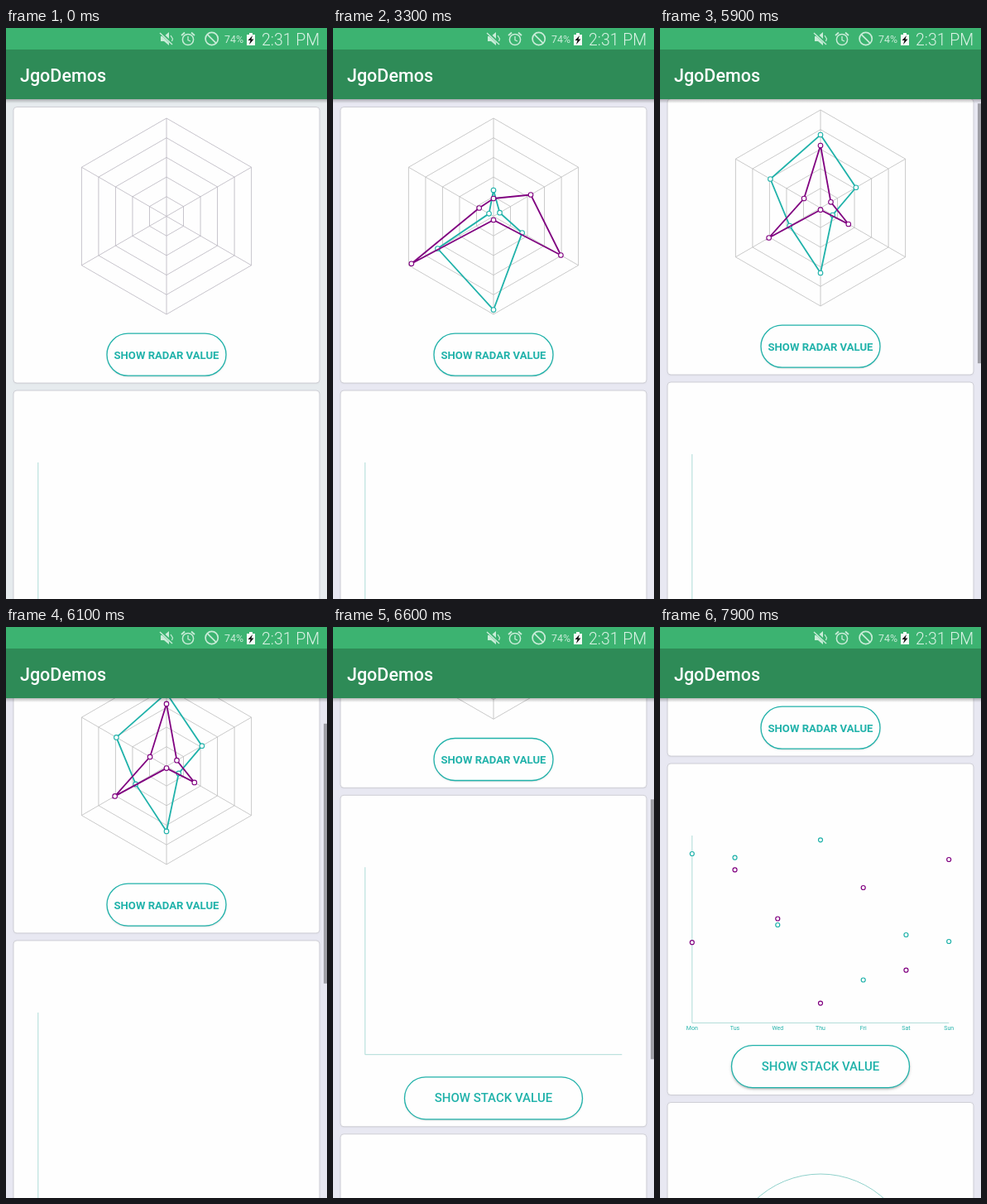
Write an HTML page with a canvas that moves like this. It is 388 px wide and 690 px high and loops after 8 s.

```html
<!DOCTYPE html>
<html lang="en">
<head>
<meta charset="utf-8">
<title>Charts</title>
<style>
  html, body { margin: 0; width: 100%; height: 100%; overflow: hidden; background: #e8e8f2; }
  canvas { display: block; width: 388px; height: 690px; }
</style>
</head>
<body>
<canvas id="stage"></canvas>
<script>
const W = 388, H = 690, LOOP = 8000, STEP = 100;
const TEAL = '#20b2aa', PURPLE = '#800080', AXIS = '#a6d9d4', ICON = '#c9ecd8';
const canvas = document.getElementById('stage');
const ctx = canvas.getContext('2d');
const dpr = window.devicePixelRatio || 1;
canvas.width = W * dpr;
canvas.height = H * dpr;

// Radar radii, clockwise from the top
const radar = [
  { color: TEAL, a: [31.5, 8.7, 40, 113, 78, 6.3], b: [88.5, 49.5, 17, 78.5, 43, 70] },
  { color: PURPLE, a: [21.5, 52, 94, 4.5, 114.5, 20], b: [75.5, 14.4, 39, 2.2, 72, 23] }
];
const days = ['Mon', 'Tus', 'Wed', 'Thu', 'Fri', 'Sat', 'Sun'];
const stack = [
  { color: TEAL, y: [547, 551.7, 633, 530.3, 699.5, 645, 653] },
  { color: PURPLE, y: [654.2, 566.4, 625.5, 727.6, 588, 687.7, 554] }
];

const clamp = x => Math.max(0, Math.min(1, x));
const span = (t, from, to) => clamp((t - from) / (to - from));
const smooth = u => 0.5 - Math.cos(Math.PI * u) / 2;

function scrollAt(t) {
  if (t < 6300) return 135 * Math.pow(span(t, 5800, 6300), 1.617);
  return 135 + 138 * (1 - Math.pow(1 - span(t, 6300, 6900), 1.85));
}

function line(points, color, width, close) {
  ctx.beginPath();
  points.forEach(([x, y]) => ctx.lineTo(x, y));
  if (close) ctx.closePath();
  ctx.strokeStyle = color;
  ctx.lineWidth = width;
  ctx.stroke();
}

function circle(x, y, r, color, width, fill) {
  ctx.beginPath();
  ctx.arc(x, y, r, 0, Math.PI * 2);
  if (fill) {
    ctx.fillStyle = fill;
    ctx.fill();
  }
  ctx.strokeStyle = color;
  ctx.lineWidth = width;
  ctx.stroke();
}

function text(str, x, y, font, color, align = 'left') {
  ctx.font = font + ' Roboto, sans-serif';
  ctx.fillStyle = color;
  ctx.textAlign = align;
  ctx.fillText(str, x, y);
}

function box(x, y, w, h, r, stroke, width, shadow, depth) {
  ctx.beginPath();
  ctx.roundRect(x, y, w, h, r);
  ctx.save();
  ctx.shadowColor = shadow;
  ctx.shadowBlur = depth * 2 * dpr;
  ctx.shadowOffsetY = depth * dpr;
  ctx.fillStyle = '#fefefe';
  ctx.fill();
  ctx.restore();
  ctx.strokeStyle = stroke;
  ctx.lineWidth = width;
  ctx.stroke();
}

function card(y, h) {
  box(9, y, 370, h, 4, '#cfcfd6', 1, 'rgba(0,0,0,.08)', 0.7);
}

function button(label, x, y, w, h, font, pressed) {
  box(x, y, w, h, h / 2, TEAL, 1.3, `rgba(0,0,0,${pressed ? 0.36 : 0.2})`, pressed ? 1.6 : 1);
  text(label, x + w / 2, y + h / 2 + 5, font, TEAL, 'center');
}

function polar(r, i) {
  const a = i * Math.PI / 3;
  return [194 + r * Math.sin(a), 227.5 - r * Math.cos(a)];
}

function drawRadar(t) {
  const R = 118.5, grid = t < 2200 ? '#b9b5bf' : '#bdbdbd';
  const axes = [0, 1, 2, 3, 4, 5];
  for (let k = 1; k <= 5; k++) line(axes.map(i => polar(R * k / 5, i)), grid, 0.8, true);
  for (let i = 0; i < 3; i++) line([polar(R, i), polar(R, i + 3)], grid, 0.8);
  if (t <= 2100) return;
  const grow = smooth(span(t, 2100, 2900));
  const morph = smooth(span(t, 4000, 4700));
  for (const s of radar) {
    const pts = axes.map(i => polar(grow * (s.a[i] + (s.b[i] - s.a[i]) * morph), i));
    line(pts, s.color, 1.8, true);
    pts.forEach(([x, y]) => circle(x, y, 2.8, s.color, 1.1, '#fff'));
  }
}

function drawStack(t) {
  line([[38.8, 525], [38.8, 751.4], [349.3, 751.4]], AXIS, 0.9);
  if (t < 7900) return;
  days.forEach((d, i) => {
    const x = 38.8 + i * 51.73;
    text(d, x, 760, '7px', TEAL, 'center');
    stack.forEach(s => circle(x, s.y[i], 2.5, s.color, 1.2, '#fff'));
  });
}

function drawPage(t) {
  ctx.save();
  ctx.translate(0, -scrollAt(t));
  const pressed = (t >= 2100 && t < 2500) || (t >= 4000 && t < 4400);
  card(95.5, 333.5);
  drawRadar(t);
  button('SHOW RADAR VALUE', 122, 369.2, 144, 51, '700 13.1px', pressed);
  card(438, 400.5);
  drawStack(t);
  button('SHOW STACK VALUE', 86.5, 778.6, 215, 51, '500 15px', t >= 7800);
  card(847.5, 400);
  circle(194, 1048, 114, '#84ccc6', 0.9);
  ctx.restore();
}

function drawScrollbar(t) {
  if (t < 5900 || t >= 7500) return;
  ctx.fillStyle = `rgba(90,90,95,${t >= 7400 ? 0.25 : 0.5})`;
  ctx.fillRect(384, 86 + scrollAt(t) * 0.521, 4, 314);
}

function drawIcons() {
  // Muted speaker
  ctx.fillStyle = ICON;
  ctx.beginPath();
  [[187, 10], [191, 10], [197, 5], [197, 21], [191, 16], [187, 16]].forEach(p => ctx.lineTo(...p));
  ctx.fill();
  line([[186, 5], [202, 20]], '#3cb371', 3.4);
  line([[186, 6], [201, 20]], ICON, 1.4);
  line([[199, 9], [201.5, 13], [200.5, 16]], ICON, 1.2);
  // Alarm clock
  circle(220, 14, 6.6, ICON, 1.5);
  line([[220, 10], [220, 14.5], [223, 16]], ICON, 1.3);
  line([[212, 9], [216, 5.5]], ICON, 1.7);
  line([[224, 5.5], [228, 9]], ICON, 1.7);
  // No entry
  circle(248.7, 13, 7.6, ICON, 1.7);
  line([[243.4, 7.8], [254, 18.3]], ICON, 1.7);
  // Charging battery
  ctx.fillStyle = '#f4fbf7';
  ctx.fillRect(291, 8, 10, 13);
  ctx.fillRect(294, 6, 4, 2);
  ctx.fillStyle = '#111';
  ctx.beginPath();
  [[298, 9], [292.5, 15], [295.5, 15], [294, 20], [299.5, 13.5], [296.5, 13.5]].forEach(p => ctx.lineTo(...p));
  ctx.fill();
}

function drawHeader() {
  const shade = ctx.createLinearGradient(0, 86, 0, 91);
  shade.addColorStop(0, 'rgba(0,0,0,.26)');
  shade.addColorStop(1, 'rgba(0,0,0,0)');
  ctx.fillStyle = shade;
  ctx.fillRect(0, 86, W, 5);
  ctx.fillStyle = '#2e8b57';
  ctx.fillRect(0, 26, W, 60);
  ctx.fillStyle = '#3cb371';
  ctx.fillRect(0, 0, W, 26);
  text('JgoDemos', 17, 64.5, '500 21.5px', '#fff');
  drawIcons();
  text('74%', 264, 18, '12.4px', ICON);
  text('2:31 PM', 309, 21, '300 19.5px', '#d9f2e4');
}

function draw(t) {
  ctx.setTransform(dpr, 0, 0, dpr, 0, 0);
  ctx.fillStyle = t < 2200 ? '#e6ebee' : '#e8e8f2';
  ctx.fillRect(0, 0, W, H);
  drawPage(t);
  drawScrollbar(t);
  drawHeader();
}

const start = performance.now();
function tick() {
  const t = (performance.now() - start) % LOOP;
  draw(Math.floor(t / STEP) * STEP);
  requestAnimationFrame(tick);
}
tick();
</script>
</body>
</html>
```
